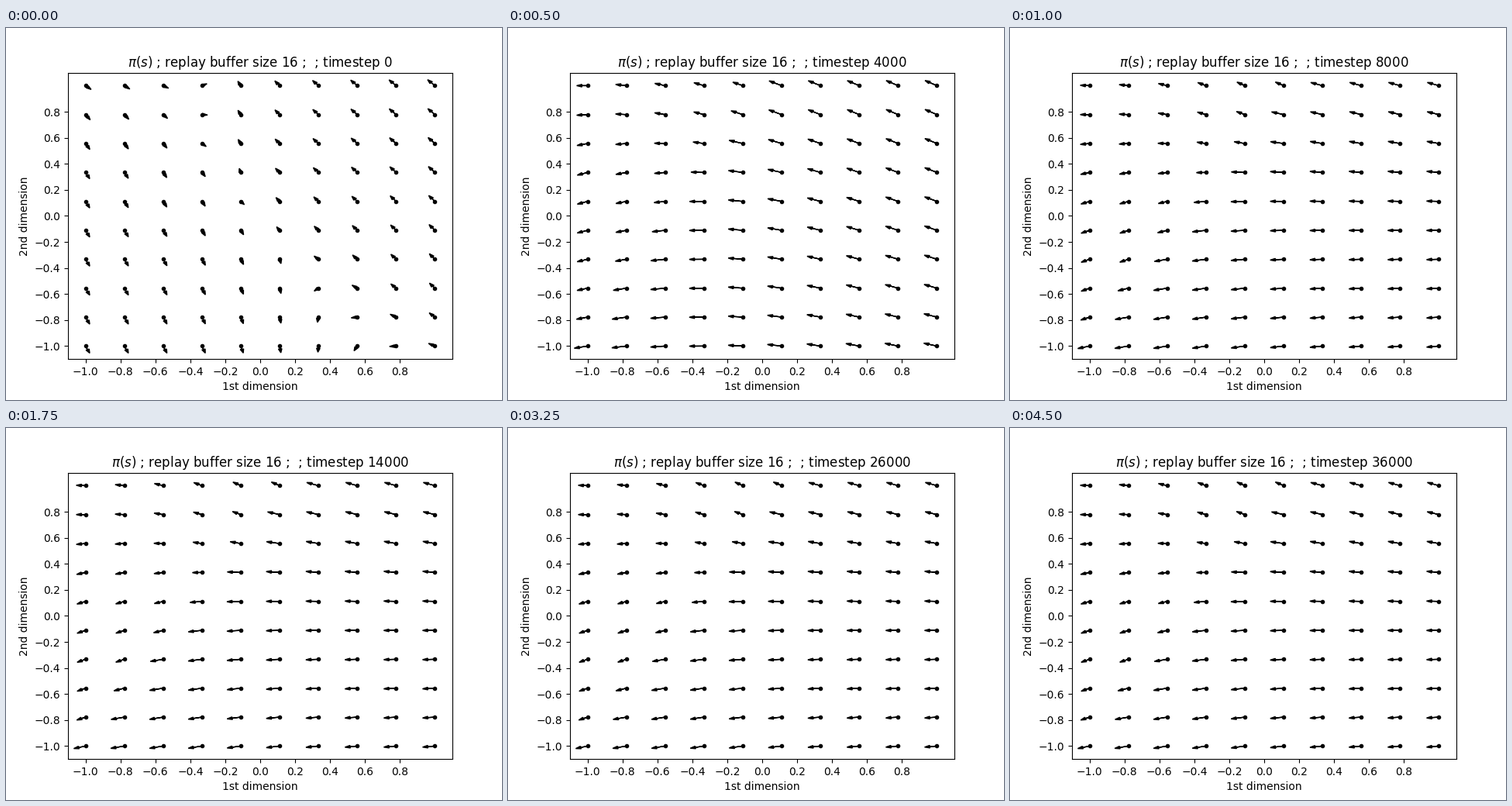
These frames come from a looping animation (640x480 px, 4.75 s). A matplotlib script:

```python
import numpy as np
import matplotlib.pyplot as plt
from matplotlib.animation import FuncAnimation

FRAMES, INTERVAL = 19, 250
N = 10
SETTLED = 4  # frame from which the policy no longer changes
HEAD_WIDTH, HEAD_LENGTH = 0.02, 0.03
ASPECT = 496 / 369.6  # pixels per unit in x over pixels per unit in y

# Rows run from top to bottom, columns from left to right.
row, col = np.mgrid[0:N, 0:N].astype(float)


def sigmoid(z):
    return 1 / (1 + np.exp(-z))


def untrained():
    """Actions that point away from a curved boundary between two regions."""
    off_x = col - 3.4 - 2.4 * sigmoid((row - 4.6) / 1.2)
    off_y = col - 2.85 - 0.13 * row - 0.05 * row**2
    down = 0.027 - 0.015 * np.exp(-row / 1.5)
    dx = np.where(off_x < 0,
                  -0.0125 * np.tanh(off_x / 3),
                  -(0.024 - 0.001 * row) * np.tanh(off_x / 3.7))
    dy = np.where(off_y < 0,
                  down * np.tanh(off_y / 2.8),
                  0.026 * np.tanh(off_y / 4))
    return dx, dy


def lengths(short, long, right, edge, tilt):
    """Short actions above a slanted edge, long below, medium at the right."""
    length = short + (long - short) * sigmoid((col - edge + tilt * row) / 0.2)
    return length - (long - right) * sigmoid((col - 5.3) / 0.4)


def leftward(length, slope):
    """Actions to the left; the slope is the one seen on screen."""
    slope = ASPECT * slope
    dx = -length / np.hypot(1, slope)
    return dx, -dx * slope


def half_trained():
    level = 3.1 * np.tanh((row / 2.5)**2)  # column where actions are level
    slope = (0.44 - 0.0025 * row**2) * np.tanh((col - level) / 3.7)
    return leftward(lengths(0.032, 0.054, 0.049, 4.5, 0.52), slope)


def trained():
    length = lengths(0.023, 0.050, 0.041, 5.3, 0.60)
    fall = 0.0085 * np.tanh((row / 3.5)**2)
    rise = (0.0113 - 0.0007 * row) * sigmoid((col - 2 - 0.3 * row) / 0.85)
    return leftward(length, (rise - fall) / length)


policies = np.array([untrained(), half_trained(), trained()])


def actions(frame):
    """Ease from one policy to the next, two frames for each."""
    first, step = divmod(min(frame, SETTLED), 2)
    part = (step / 2)**0.6
    last = min(first + 1, len(policies) - 1)
    return (1 - part) * policies[first] + part * policies[last]


fig, ax = plt.subplots(figsize=(6.4, 4.8), dpi=100)
xs = -1 + 2 * col.ravel() / (N - 1)
ys = 1 - 2 * row.ravel() / (N - 1)
ax.plot(xs, ys, "k.")
arrows = [ax.arrow(x, y, -0.03, 0, head_width=HEAD_WIDTH,
                   head_length=HEAD_LENGTH, color="black")
          for x, y in zip(xs, ys)]

ticks = np.arange(-1, 1, 0.2)
ax.set(xlim=(-1.1, 1.1), ylim=(-1.1, 1.1), xticks=ticks, yticks=ticks,
       xlabel="1st dimension", ylabel="2nd dimension")
title = ax.set_title("", pad=5.3)


def update(frame):
    dx, dy = actions(frame)
    for arrow, u, v in zip(arrows, dx.ravel(), dy.ravel()):
        arrow.set_data(dx=u, dy=v)
    title.set_text(rf"$\pi(s)$ ; replay buffer size 16 ;  ; timestep {2000 * frame}")
    return [title, *arrows]


anim = FuncAnimation(fig, update, frames=FRAMES, interval=INTERVAL,
                     repeat=True, repeat_delay=0)
plt.show()
```
